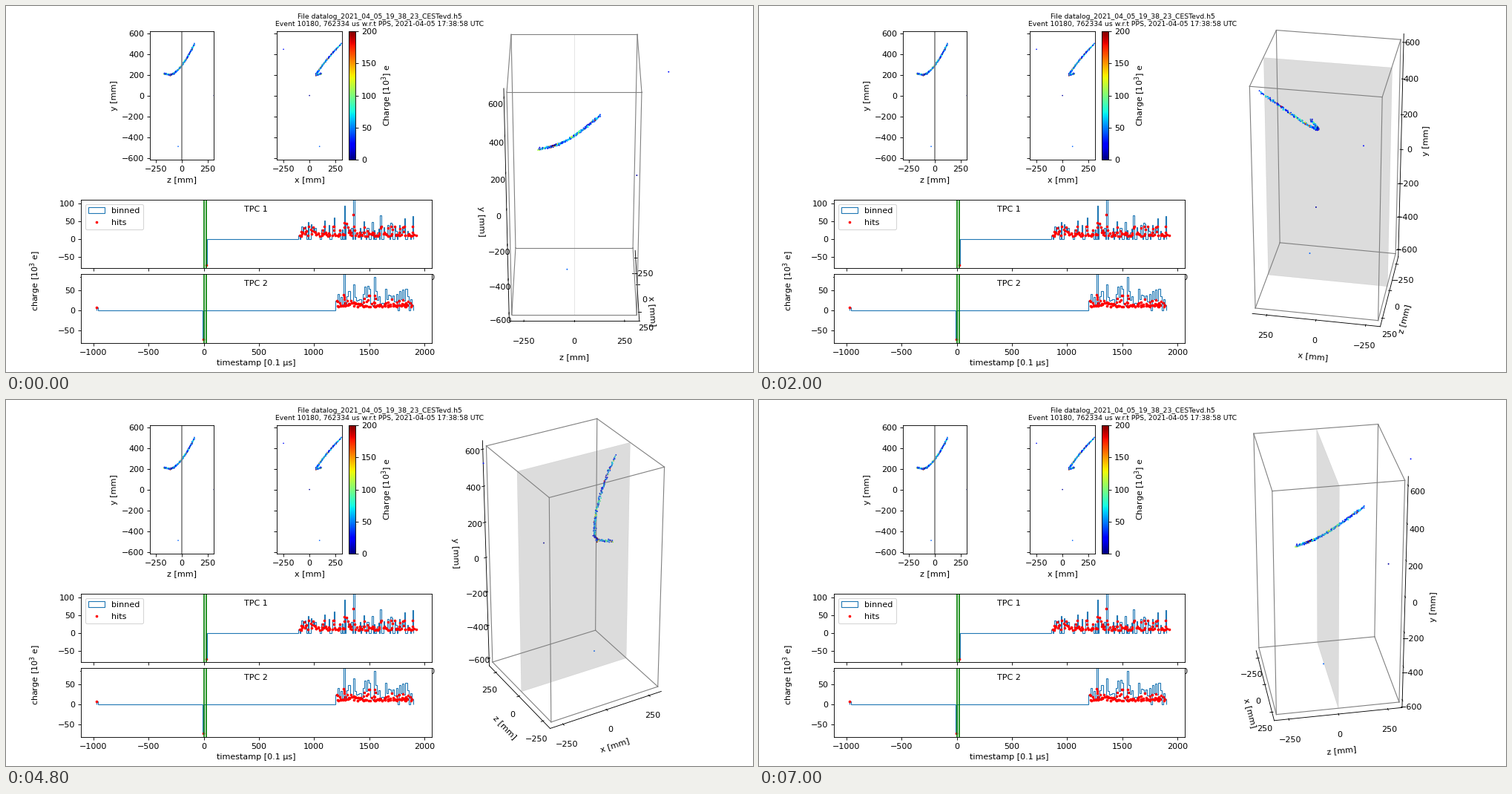
Recreate the animation shown at these times as a matplotlib script. Size 1007 px wide and 493 px high, loop 7200 ms.

```python
from itertools import combinations, product

import numpy as np
import matplotlib.pyplot as plt
from matplotlib.animation import FuncAnimation
from mpl_toolkits.mplot3d.art3d import Poly3DCollection

W, H, DPI = 1007, 493, 80
FRAMES, INTERVAL = 36, 200
HALF, TALL = 310, 620            # detector half sizes in mm
MARGIN = 25 / 24                 # axis lines sit a little outside the box
SIDE_TICKS = (-250, 0, 250)
TALL_TICKS = range(-600, 601, 200)

plt.rcParams.update({"font.family": "DejaVu Sans", "font.size": 10})
rng = np.random.default_rng(7)
fig = plt.figure(figsize=(W / DPI, H / DPI), dpi=DPI, facecolor="white")


def add_axes(left, top, right, bottom, **kwargs):
    """Axes from pixel edges, measured from the top left of the stage."""
    return fig.add_axes([left / W, 1 - bottom / H,
                         (right - left) / W, (bottom - top) / H], **kwargs)


def text(x, y, label, **kwargs):
    fig.text(x / W, 1 - y / H, label, ha="center", va="center", **kwargs)


def track():
    """Curved ionisation track with a short stub at its kink: x, y, z, charge."""
    kink = np.array([[65], [200], [-110]])
    s = np.linspace(0, 1, 200)
    arc = kink + np.array([237 * s**1.85, 297 * s**1.6, 231 * s])
    u = np.linspace(0, 1, 45)
    stub = kink + np.array([50 * u, 11 * u, -61 * u])
    points = np.hstack([arc, stub])
    points += rng.normal(0, 3, points.shape)
    charge = np.clip(rng.gamma(3.2, 20, points.shape[1]), 8, 190)
    near_kink = np.abs(points[2] + 105) < 18
    charge[near_kink] *= rng.choice([0.3, 0.5, 2.2], near_kink.sum())
    return np.vstack([points, charge])


def timed_hits(start, stop, count, spread, peak):
    """Evenly spread hits, larger around one time; charges in 10^3 e."""
    t = np.linspace(start, stop, count) + rng.uniform(-14, 14, count)
    burst = 1 + peak * np.exp(-((t - 1330) / 45) ** 2)
    return t, 8 + np.minimum(rng.exponential(spread, count), 28) * burst


def draw_panel(number, top, bottom, ylim, early, hits):
    t, q = np.hstack([np.transpose(early), hits])
    ax = add_axes(101.1, top, 574.1, bottom)
    ax.hist(t, bins=np.linspace(early[0][0], 1900, 201), weights=q,
            histtype="step", label="binned")
    ax.plot(t, q, "r.", markersize=4.5, label="hits")
    for edge in (0, 22):
        ax.axvline(edge, color="green")
    ax.set(xlim=(-1113, 2068), ylim=ylim, xticks=range(-1000, 2001, 500))
    text(337, top + 12.7, f"TPC {number}")
    return ax


strays = np.array([(-250, 445, 466, 28), (0, 0, 309, 6), (97, -490, -36, 45)])
x, y, z, charge = np.hstack([track(), strays.T])
jet = dict(c=charge, cmap="jet", vmin=0, vmax=200, linewidths=0)

fig.text(0.5, 0.98, "File datalog_2021_04_05_19_38_23_CESTevd.h5\n"
         "Event 10180, 762334 us w.r.t PPS, 2021-04-05 17:38:58 UTC",
         ha="center", va="top", fontsize="small")

# Projections
ax_zy = add_axes(194.1, 34.1, 280.1, 207.1)
ax_xy = add_axes(365.1, 34.1, 453.1, 207.1)
for ax, across, limit, name in ((ax_zy, z, 307, "z"), (ax_xy, x, 314, "x")):
    dots = ax.scatter(across, y, s=2.2, **jet)
    ax.set(xlim=(-limit, limit), ylim=(-618, 618), xlabel=f"{name} [mm]",
           xticks=SIDE_TICKS, yticks=TALL_TICKS)
ax_zy.axvline(0, color="gray")
ax_zy.set_ylabel("y [mm]")
ax_xy.tick_params(labelleft=False)
fig.colorbar(dots, cax=add_axes(462.1, 34.1, 471.1, 207.1),
             label="Charge [$10^3$] e")

# Charge against time
upper = draw_panel(1, 261.1, 353.1, (-81.5, 110.5), [(22, -73)],
                   timed_hits(870, 1920, 125, 10, 1.7))
upper.legend(loc="upper left")
lower = draw_panel(2, 361.1, 454.1, (-82.4, 89.8), [(-975, 7), (-2, -73)],
                   timed_hits(1205, 1880, 108, 8, 0.3))
lower.set_xlabel("timestamp [0.1 µs]")
text(39.5, 370, "charge [$10^3$ e]", rotation=90)

# Rotating detector: horizontal axes are x and z, vertical axis is y
ax3 = add_axes(550.8, 24.2, 969.9, 443.3, projection="3d")
ax3.patch.set_visible(False)
ax3.set_box_aspect((1, 1, 2))
ax3.grid(False)
wide, high = HALF * MARGIN, TALL * MARGIN
ax3.set(xlim=(-wide, wide), ylim=(-wide, wide), zlim=(-high, high),
        xticks=SIDE_TICKS, yticks=SIDE_TICKS, zticks=TALL_TICKS,
        xlabel="x [mm]", ylabel="z [mm]")
ax3.set_zlabel("y [mm]", labelpad=14)
for axis in (ax3.xaxis, ax3.yaxis, ax3.zaxis):
    axis.pane.set_visible(False)

corners = product((-HALF, HALF), (-HALF, HALF), (-TALL, TALL))
for a, b in combinations(corners, 2):
    if np.count_nonzero(np.subtract(a, b)) == 1:
        ax3.plot(*zip(a, b), color="gray", lw=1)
cathode = [(-HALF, 0, -TALL), (HALF, 0, -TALL), (HALF, 0, TALL), (-HALF, 0, TALL)]
ax3.add_collection3d(Poly3DCollection(
    [cathode], facecolor=(0.5, 0.5, 0.5, 0.27),
    edgecolor=(0.5, 0.5, 0.5, 0.2), linewidth=0.5))
ax3.scatter(x, z, y, s=3, depthshade=False, **jet)


def update(frame):
    ax3.view_init(elev=30, azim=frame * 360 / FRAMES)
    return []


anim = FuncAnimation(fig, update, frames=FRAMES, interval=INTERVAL,
                     init_func=lambda: [], repeat=True, blit=False)
plt.show()
```
